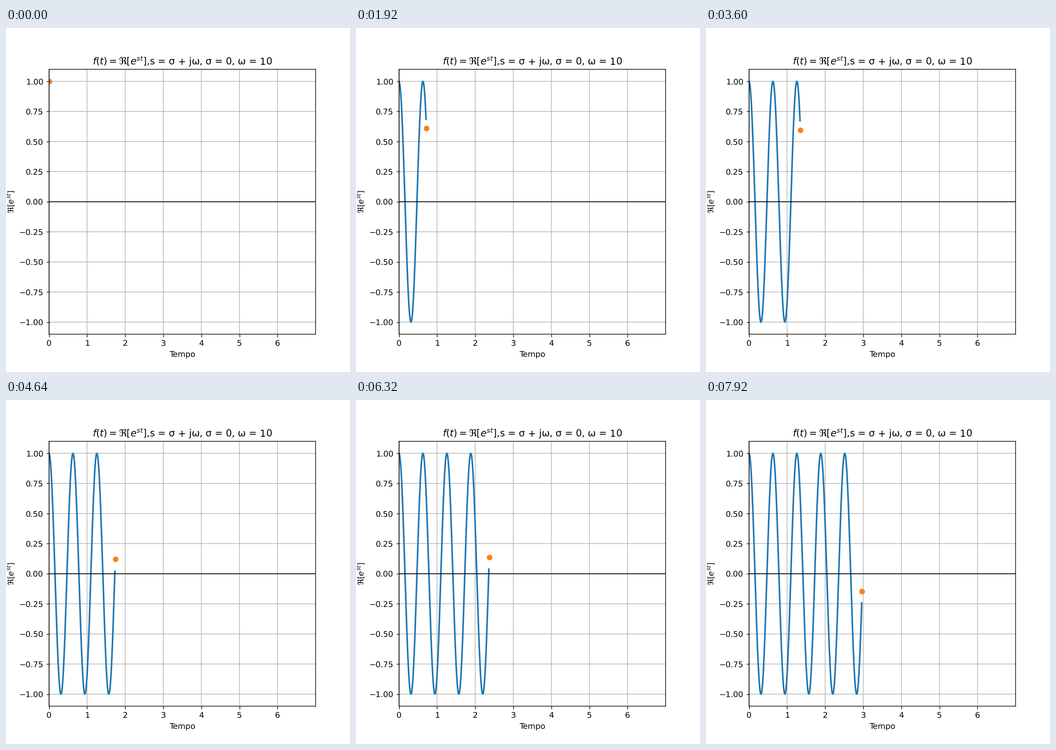
A matplotlib script for the animation above (8000 ms loop, 748x748 px).

```python
import numpy as np
import matplotlib.pyplot as plt
from matplotlib.animation import FuncAnimation

SIZE = 748
FRAMES = 100
INTERVAL = 80
SAMPLES_PER_FRAME = 3
SIGMA, OMEGA = 0, 10

# Keep lines and glyphs at their true sub-pixel geometry.
plt.rcParams.update({
    "font.family": "DejaVu Sans",
    "path.snap": False,
    "text.hinting": "none",
})

t = np.arange(0, 7, 0.01)
signal = np.real(np.exp((SIGMA + 1j * OMEGA) * t))

fig, ax = plt.subplots(figsize=(6, 6), dpi=SIZE / 6)
curve, = ax.plot([], [], color="C0", lw=2)
dot, = ax.plot([], [], "o", color="C1")

ax.axhline(0, color="black", lw=1)
ax.axvline(0, color="black", lw=1)
ax.set_xlim(0, 7)
ax.set_ylim(-1.1, 1.1)
ax.set_xticks(np.arange(0, 7))
ax.grid(True)
ax.set_title(rf"$f(t) = \Re[e^{{st}}]$,s = σ + jω, σ = {SIGMA}, ω = {OMEGA}")
ax.set_xlabel("Tempo")
ax.set_ylabel(r"$\Re[e^{st}]$")


def update(frame):
    head = frame * SAMPLES_PER_FRAME
    curve.set_data(t[:head], signal[:head])
    dot.set_data([t[head]], [signal[head]])
    return curve, dot


anim = FuncAnimation(fig, update, frames=FRAMES, interval=INTERVAL,
                     repeat=True, repeat_delay=0)
plt.show()
```
